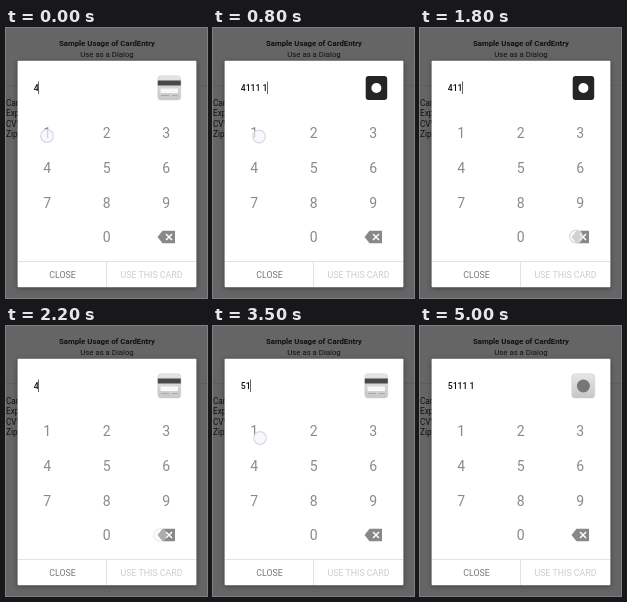
Animation, 201 px wide and 270 px high, one loop 5500 ms. Source, as an HTML page:

```html
<!DOCTYPE html>
<html lang="en">
<head>
<meta charset="utf-8">
<title>Card entry dialog</title>
<style>
  html, body { margin: 0; width: 100%; height: 100%; overflow: hidden; background: #656565; }
  svg { display: block; width: 100%; height: 100%; font-family: Roboto, sans-serif; }
  .mid { text-anchor: middle; }
  .page { font-size: 7.8px; fill: #111; }
  .labels { font-size: 8.2px; }
  .field { font-size: 8.8px; }
  #number { font-weight: 500; font-size: 8.7px; }
  #keys { font-size: 14px; fill: #8a8a8a; }
  #dialog { filter: drop-shadow(0 1.5px 2.5px #0006); }
</style>
</head>
<body>
<svg viewBox="0 0 201 270">
  <defs>
    <linearGradient id="tile" x2="0" y2="1">
      <stop stop-color="#e6e6e6"/><stop offset="1" stop-color="#c6c6c6"/>
    </linearGradient>
  </defs>
  <rect width="201" height="270" fill="#656565"/>
  <path d="M0 57.5H201" stroke="#5d5d5d"/>
  <g class="page">
    <text class="mid" x="101" y="17.8" font-weight="700">Sample Usage of CardEntry</text>
    <text class="mid" x="101" y="28.8">Use as a Dialog</text>
    <g class="labels">
      <text y="77.8">Card</text>
      <text y="88.300">Expiry</text>
      <text y="98.800">CVV</text>
      <text y="109.300">Zip</text>
    </g>
  </g>

  <rect id="dialog" x="11.6" y="32.7" width="178.8" height="226.6" rx="1" fill="#fff"/>
  <path d="M12 233.500H190M100.500 234V259" stroke="#e2e2e2"/>
  <g class="mid field">
    <text x="56.500" y="249.500" fill="#777">CLOSE</text>
    <text x="145.500" y="249.500" fill="#ccc">USE THIS CARD</text>
  </g>

  <g id="keys" class="mid"></g>
  <path d="M151.500 209L156.500 202.700H169V215.300H156.500Z" fill="#888"/>
  <path d="M160 206l6 6m0-6l-6 6" stroke="#fff" stroke-width="1.500"/>

  <text id="hint" class="field" x="28" y="63.200" fill="#888">Enter card number</text>
  <text id="number" x="27.700" y="63.200" fill="#111"></text>
  <rect id="caret" y="53.500" width="1" height="12.500" fill="#666"/>

  <g id="blank">
    <rect x="151.800" y="47.800" width="23" height="24.200" rx="3" fill="url(#tile)" stroke="#ccc" stroke-width=".5"/>
    <rect x="151.800" y="52.500" width="23" height="5" fill="#484848"/>
    <rect x="154.500" y="60.500" width="17.500" height="4.500" fill="#f8f8f8"/>
    <path d="M155 67.500H163M166 67.500H172" stroke="#aaa"/>
  </g>
  <g id="dark">
    <rect x="152.700" y="48" width="21.500" height="24" rx="3" fill="#252528"/>
    <circle cx="163.400" cy="60" r="5" fill="#fff"/>
  </g>
  <g id="light">
    <rect x="151.800" y="47.800" width="23" height="24.200" rx="3" fill="url(#tile)" stroke="#ccc" stroke-width=".5"/>
    <circle cx="163.400" cy="60" r="6.500" fill="#777"/>
  </g>

  <circle id="touch" r="6.300" fill="#f6f6fcaa" stroke="#d8d8e4" stroke-width="1.200"/>
</svg>
<script>
const $ = id => document.getElementById(id);
const clamp = v => Math.max(0, Math.min(1, v));
const LOOP = 5500, STEP = 100, FADE = 200;

// press time, release time, number after release, touch x, y
const taps = [
  [-100, 0, '4', 41, 108],
  [200, 200, '41', 41, 108],
  [400, 400, '411', 43, 108],
  [600, 600, '4111', 44, 108],
  [800, 800, '4111 1', 46, 108.5],
  [1300, 1500, '4111', 158, 209],
  [1700, 1800, '411', 156, 208.5],
  [1900, 1900, '41', 155, 209],
  [2100, 2100, '4', 154, 209],
  [2400, 2600, '', 155, 209],
  [2800, 3100, '5', 102.5, 150],
  [3500, 3500, '51', 47, 112],
  [3700, 3800, '511', 46, 111],
  [4000, 4000, '5111', 45, 111],
  [4200, 4300, '5111 1', 45, 110]
];

[...'1234567890'].forEach((digit, i) => {
  const col = digit === '0' ? 1 : i % 3, row = Math.floor(i / 3);
  $('keys').innerHTML +=
    `<text x="${41.2 + col * 59.5}" y="${110 + row * 34.8}">${digit}</text>`;
});

function draw(now) {
  const t = Math.floor(now % LOOP / STEP) * STEP;

  const value = taps.filter(tap => tap[1] <= t).pop()[2];
  const number = $('number');
  if (number.textContent !== value) number.textContent = value;
  $('hint').setAttribute('opacity', value ? 0 : 1);
  $('caret').setAttribute('x', Math.round(27.5 + (value ? number.getComputedTextLength() : 0)));
  $('caret').setAttribute('opacity', t < 5000 ? 1 : 0);

  const [, up, , x, y] = taps.filter(tap => tap[0] <= t).pop();
  $('touch').setAttribute('transform', `translate(${x} ${y})`);
  $('touch').setAttribute('opacity', clamp(1 - (t - up) / FADE));

  const dark = clamp((t - 550) / FADE) - clamp((t - 1800) / FADE);
  const light = clamp((t - 3950) / FADE);
  $('dark').setAttribute('opacity', dark);
  $('light').setAttribute('opacity', light);
  $('blank').setAttribute('opacity', dark === 1 || light === 1 ? 0 : 1);

  requestAnimationFrame(() => draw(performance.now() - start));
}
const start = performance.now();
draw(0);
</script>
</body>
</html>
```
